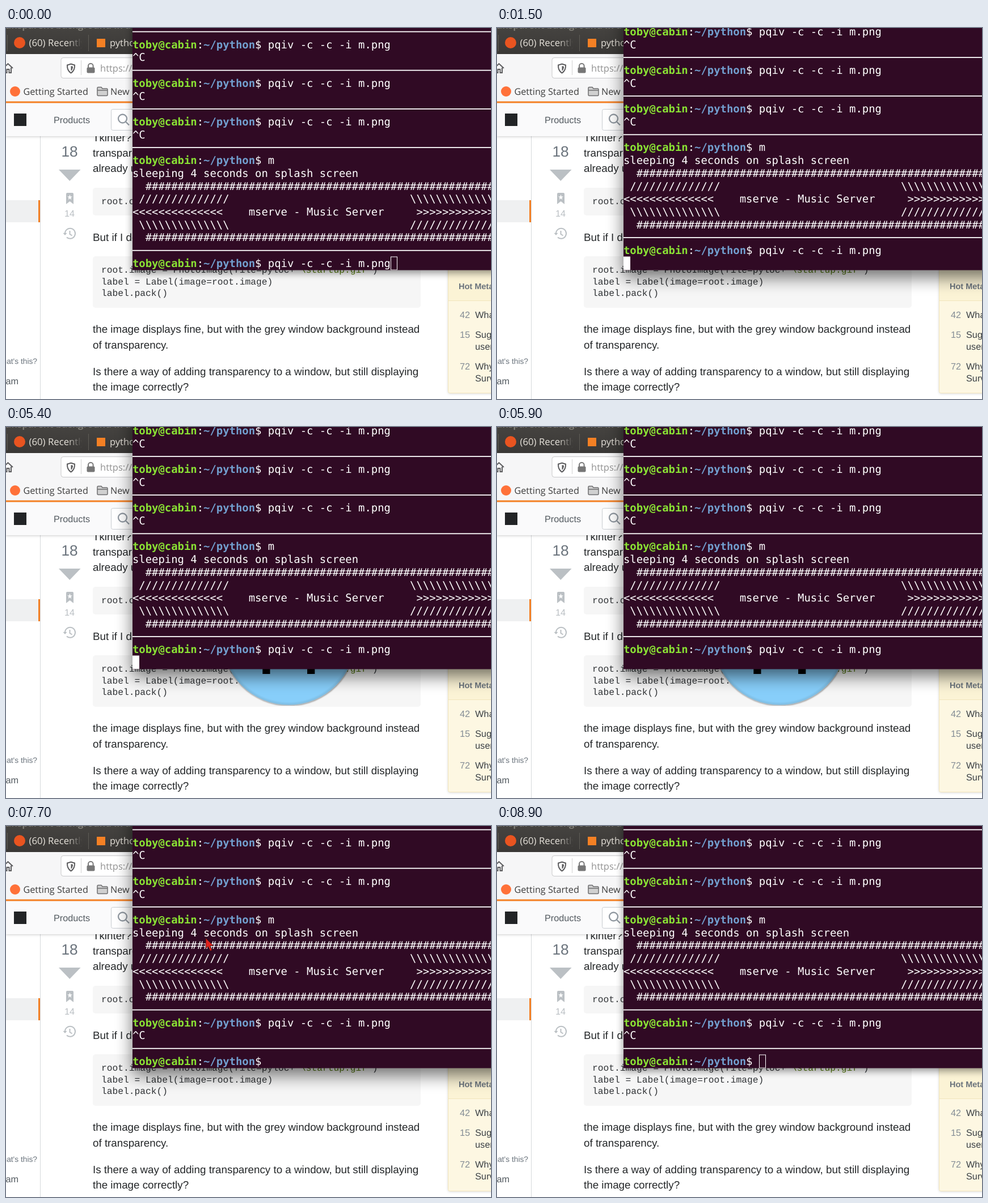
These frames come from a looping animation (855x655 px, 9 s). An HTML page:

```html
<!DOCTYPE html>
<html lang="en">
<head>
<meta charset="utf-8">
<title>Splash screen demo</title>
<style>
html, body { margin: 0; width: 100%; height: 100%; overflow: hidden; background: #fff; }
#stage { display: block; width: 855px; height: 655px; }
text { text-rendering: geometricPrecision; }
.ui { font-family: "Open Sans", "Noto Sans", sans-serif; font-size: 16.5px; fill: #3d3d3d; }
.sans { font-family: "Liberation Sans", Arial, sans-serif; font-size: 16.25px; fill: #535a60; }
.body { font-size: 18.79px; fill: #242729; }
.code { font-family: "Liberation Mono", "Courier New", monospace; font-size: 16.25px; fill: #303336; }
.term { font-family: "DejaVu Sans Mono", monospace; font-size: 18.9px; fill: #fff; }
.user { font-weight: bold; fill: #8ae234; }
.path { font-weight: bold; fill: #729fcf; }
</style>
</head>
<body>
<svg id="stage" viewBox="0 0 855 655">
  <defs>
    <linearGradient id="bar" x2="0" y2="1"><stop stop-color="#454340"/><stop offset="1" stop-color="#3a3836"/></linearGradient>
    <linearGradient id="fade" gradientUnits="userSpaceOnUse" x1="108" x2="134">
      <stop stop-color="#e6e2da"/><stop offset="1" stop-color="#e6e2da" stop-opacity="0"/>
    </linearGradient>
    <radialGradient id="disc">
      <stop offset=".95" stop-color="#87cefa"/><stop offset="1" stop-color="#7cb9de"/>
    </radialGradient>
    <clipPath id="window"><path d="M223 0H855V427.500H223Z"/></clipPath>
    <clipPath id="splashBox"><path d="M380 255H617V492H380Z"/></clipPath>
    <g id="splash" clip-path="url(#splashBox)">
      <circle cx="499" cy="374.5" r="118" fill="#333" opacity=".5" style="filter:blur(1px)"/>
      <circle cx="498.5" cy="373.5" r="117.5" fill="url(#disc)" stroke="#b9c9d3" stroke-width=".8"/>
      <text x="498.3" y="436" text-anchor="middle" font-family="DejaVu Sans, sans-serif" font-size="138">M</text>
    </g>
  </defs>
  <rect width="855" height="655" fill="#fff"/>

  <!-- question -->
  <g class="sans body">
    <text x="153" y="200">Tkinter?</text>
    <text x="153" y="227">transparent</text>
    <text x="153" y="254">already using</text>
    <text x="153" y="376">But if I do</text>
    <text x="153" y="538">the image displays fine, but with the grey window background instead</text>
    <text x="153" y="566">of transparency.</text>
    <text x="153" y="613">Is there a way of adding transparency to a window, but still displaying</text>
    <text x="153" y="640">the image correctly?</text>
  </g>
  <g fill="#f6f6f6">
    <rect x="153" y="282" width="578" height="49" rx="5"/>
    <rect x="153" y="403" width="578" height="91" rx="5"/>
  </g>
  <g class="code">
    <text x="168" y="311">root.config</text>
    <text x="168" y="432">root.image = PhotoImage(file=pyloc+<tspan fill="#54790d">"\startup.gif"</tspan>)</text>
    <text x="168" y="453">label = Label(image=root.image)</text>
    <text x="168" y="473">label.pack()</text>
  </g>

  <!-- votes -->
  <g class="sans" text-anchor="middle">
    <text x="112" y="227" style="font-size:26.25px;fill:#6a737c">18</text>
    <text x="112" y="333" style="fill:#bbc0c4">14</text>
  </g>
  <g fill="#bbc0c4">
    <path d="M93 250H131.500L112.250 270Z"/>
    <path d="M106 311V293Q106 291 108 291H117Q119 291 119 293V311L112.500 306Z"/>
    <path fill="#fff" d="M112.500 294L113.700 297.500H117L114.300 299.600L115.300 303L112.500 301L109.700 303L110.700 299.600L108 297.500H111.300Z"/>
  </g>
  <g fill="none" stroke="#bbc0c4" stroke-width="2">
    <path d="M104 363A9 9 0 1 1 107 369.500M112.500 358V364L116.500 366.500"/>
    <path d="M100.500 362L104 366L107.500 362" fill="#bbc0c4" stroke="none"/>
  </g>

  <!-- left menu -->
  <path d="M0 304H60V343H0Z" fill="#eff0f1"/>
  <path d="M60.500 191V655" stroke="#d6d9dc"/>
  <path d="M57 304H60V343H57Z" fill="#f48024"/>
  <g class="sans" text-anchor="end">
    <text x="55" y="593" style="font-size:13.75px;fill:#6a737c">What's this?</text>
    <text x="22" y="629">Team</text>
  </g>

  <!-- right panel -->
  <rect x="779.500" y="380" width="100" height="264.500" rx="3" fill="#fdf7e2" stroke="#f1e5bc" style="filter:drop-shadow(0 1px 2px #0002)"/>
  <path d="M780 381H855V481H780Z" fill="#fbf3d5"/>
  <path d="M780 481.500H855" stroke="#f1e5bc"/>
  <g class="sans">
    <text x="798" y="461" style="font-size:14.5px;font-weight:bold;fill:#6a737c">Hot Meta Posts</text>
    <g style="fill:#848d95"><text x="800" y="512">42</text><text x="800" y="547">15</text><text x="800" y="603">72</text></g>
    <g style="fill:#3b4045">
      <text x="827" y="512">What</text><text x="827" y="547">Suggest</text><text x="827" y="568">users</text>
      <text x="827" y="603">Why</text><text x="827" y="624">Survey</text>
    </g>
  </g>

  <!-- site header -->
  <path d="M0 132H855V191H0Z" fill="#fafafb" style="filter:drop-shadow(0 1px 2px #0003)"/>
  <rect x="14" y="151" width="22" height="22" fill="#222426"/>
  <text class="sans" x="84" y="168">Products</text>
  <rect x="185.500" y="143.500" width="200" height="37" rx="3" fill="#fff" stroke="#c8ccd0"/>
  <path d="M198 160A7.500 7.500 0 1 1 213 160A7.500 7.500 0 1 1 198 160M211 165.500L217 171.500" fill="none" stroke="#9199a1" stroke-width="2.300"/>

  <!-- browser -->
  <path d="M0 46H855V131H0Z" fill="#f6f6f7"/>
  <path d="M0 129.500H855V132.500H0Z" fill="#f48024"/>
  <rect x="97" y="52.500" width="300" height="36" rx="4" fill="#fff" stroke="#c9c9cb"/>
  <path d="M132.500 57V83" stroke="#d0d0d2"/>
  <g fill="none" stroke="#5b5b5d" stroke-width="2">
    <path d="M-5 71L3.500 63L12 71M-2 70V79H1.500V73H5.500V79H9V70"/>
    <path d="M114.500 63.500L121 65.500Q121.500 75 114.500 79.500Q107.500 75 108 65.500Z"/>
    <path d="M114.500 67V76Q118 73 118 68Z" fill="#5b5b5d" stroke="none"/>
    <path d="M145 70V67A4.300 4.300 0 0 1 153.600 67V70" stroke="#777"/>
    <rect x="142.500" y="69.500" width="14" height="10" rx="2" fill="#777" stroke="none"/>
    <path d="M161 118V106Q161 104.500 162.500 104.500H168L170 107H177.500Q179 107 179 108.500V118Q179 119.500 177.500 119.500H162.500Q161 119.500 161 118ZM161 110H179" fill="#d0d0d0" stroke="#6d6d6f" stroke-width="1.500"/>
  </g>
  <circle cx="16" cy="112" r="9" fill="#ff7139"/>
  <g class="ui">
    <text x="166" y="77" style="fill:#929292">https://</text>
    <text x="30.500" y="118" style="font-size:16.2px">Getting Started</text>
    <text x="184" y="118" style="font-size:16.2px">New</text>
  </g>
  <path d="M0 0H855V46H0Z" fill="url(#bar)"/>
  <rect id="hover" x="2" y="6" width="143" height="40" fill="#fff" opacity=".13"/>
  <path d="M2.500 12V41M145.500 12V41" stroke="#5f5d57"/>
  <circle cx="24" cy="26" r="10" fill="#e95420"/>
  <rect x="160" y="19" width="15" height="15" fill="#f48024"/>
  <g class="ui">
    <text x="-15" y="1" style="fill:#7d7b74;font-weight:bold">transparent background in a Python</text>
    <text x="40.500" y="32" style="fill:url(#fade);font-size:16.75px">(60) Recently</text>
    <text x="183" y="32" style="fill:#e6e2da">python</text>
  </g>

  <use id="back" href="#splash"/>

  <!-- terminal -->
  <rect id="dim" x="223" y="-60" width="720" height="492" opacity=".45" style="filter:blur(7px)"/>
  <rect id="glow" x="223" y="-60" width="720" height="500" opacity=".55" style="filter:blur(15px)"/>
  <g clip-path="url(#window)">
    <path d="M223 0H855V428H223Z" fill="#300a24"/>
    <g id="log" class="term"></g>
    <rect id="caret" y="404" width="11" height="23" stroke="#fff"/>
  </g>
  <use id="front" href="#splash"/>
  <path id="mouse" d="M0 0V18L4 14.500L8 22.500L11 21L7.500 13.500L13 13Z" fill="#e0201b" stroke="#4a1512"/>
</svg>
<script>
const $ = id => document.getElementById(id);
const LEFT = 223, CELL = 11.378, ROW = 22.72, BOTTOM = 404.3;
const LOOP = 9000;

const prompt = cmd => `<tspan class="user">toby@cabin</tspan>:<tspan class="path">~/python</tspan>$ ${cmd}`;
const view = "pqiv -c -c -i m.png";
const stop = ["-", prompt(view), "^C"];
const hashes = "  " + "#".repeat(58);
const slash = "/".repeat(14), back = "\\".repeat(14);
const gap = " ".repeat(28);
const lines = [
  ...stop, ...stop, ...stop,
  "-", prompt("m"), "sleeping 4 seconds on splash screen",
  hashes,
  ` ${slash}${gap}${back}`,
  `${"&lt;".repeat(14)}    mserve - Music Server     ${"&gt;".repeat(14)}`,
  ` ${back}${gap}${slash}`,
  hashes,
  ...stop, "-", prompt("")
];

// keep runs of spaces, but leave the ones inside tags alone
const solid = s => s.replace(/ (?![^<]*>)/g, "\u00a0");

$("log").innerHTML = lines.map((s, i) => {
  const y = i * ROW;
  return s === "-"
    ? `<rect x="${LEFT}" y="${y + 10.3}" width="632" height="1.8"/>`
    : `<text x="${LEFT}" y="${y + 17.6}">${solid(s)}</text>`;
}).join("");
const interrupt = $("log").children[19];

const show = (el, on) => el.style.display = on ? "" : "none";

// pointer position at each 100 ms step, slowing down towards the tab
function pointer(step) {
  if (step > 5) return [32, 19];
  const left = (1 - step / 5) ** 2;
  return [77 + 430 * left, 17 + 283 * left];
}

function draw(t) {
  const within = (a, b) => t >= a && t < b;
  const focus = within(400, 1700) || within(5400, 8900);
  const blank = within(900, 1500) || within(5800, 6600) || within(7200, 7800) || within(8400, 8900);
  const [row, col] = t < 1500 ? [18, 40] : t < 6600 ? [19, 0] : [21, 21];

  $("log").setAttribute("transform", `translate(0 ${BOTTOM - row * ROW})`);
  show(interrupt, t >= 6600);
  show($("caret"), !blank);
  $("caret").setAttribute("x", Math.round(LEFT + col * CELL) + .5);
  $("caret").setAttribute("fill", focus ? "#fff" : "none");
  show($("glow"), focus);
  show($("dim"), !focus);

  show($("front"), within(1700, 5400));
  $("front").setAttribute("opacity", t < 1800 ? .5 : 1);
  show($("back"), within(5400, 6600));

  const moving = within(7600, 8400);
  const [x, y] = pointer(Math.floor((t - 7600) / 100));
  show($("mouse"), moving);
  $("mouse").setAttribute("transform", `translate(${x} ${y})`);
  show($("hover"), moving && t < 8200 && y < 46);
}

let start;
function frame(now) {
  start ??= now;
  draw((now - start) % LOOP);
  requestAnimationFrame(frame);
}
draw(0);
requestAnimationFrame(frame);
</script>
</body>
</html>
```
